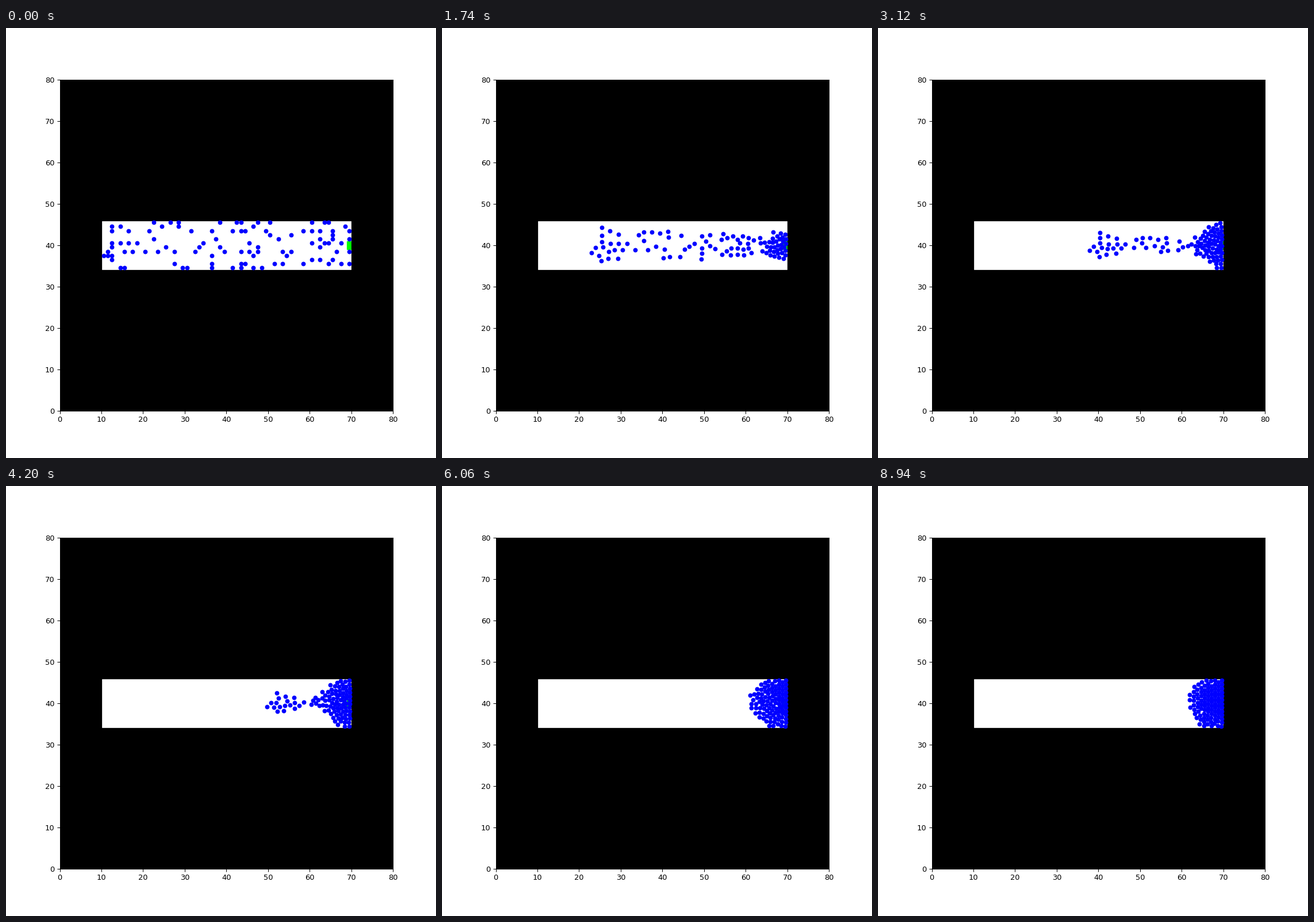
Animation of 748 by 748 pixels, one loop 9 s. Source, as a matplotlib script:

```python
import numpy as np
import matplotlib.pyplot as plt
from matplotlib.animation import FuncAnimation
from matplotlib.patches import Rectangle

INCHES, DPI = 8, 93.5
FRAMES, INTERVAL = 150, 60

# corridor and exit, in axis units
X0, X1, Y0, Y1 = 10, 70, 34, 46
GOAL = np.array([70.0, 40.0])

# social force model, time measured in frames
AGENTS = 100
SPEED, TAU = 0.665, 10.1
PUSH, RANGE, RADIUS = 0.1, 0.08, 0.5
DAMPING, SOFT = 1.5, 0.1
SUBSTEPS = 12

# the last walkers stay in view longest: column -> rows
TAIL = {10: [37], 11: [37, 38], 12: [36, 37, 39, 40, 43, 44],
        14: [34, 40, 44], 15: [34, 38], 16: [40, 43], 17: [38], 18: [40]}


def start():
    """Tail walkers plus a random scatter of distinct cells ahead of them."""
    tail = [(c, r) for c, rows in TAIL.items() for r in rows]
    first = max(TAIL) + 1
    height = Y1 - Y0
    rng = np.random.default_rng(4)
    cells = rng.choice((X1 - first) * height, AGENTS - len(tail), replace=False)
    crowd = [(first + n // height, Y0 + n % height) for n in cells]
    return np.array(tail + crowd) + 0.5


def repel(gap):
    return PUSH * np.exp(np.minimum(-gap / RANGE, 4))


def drag(gap):
    return DAMPING * np.clip(-gap / SOFT, 0, 1)


def acceleration(pos, vel):
    to_goal = GOAL - pos
    heading = to_goal / np.maximum(np.linalg.norm(to_goal, axis=1), 0.05)[:, None]
    acc = (SPEED * heading - vel) / TAU

    # neighbours push apart and lose relative speed on contact
    diff = pos[:, None] - pos[None]
    dist = np.maximum(np.hypot(diff[..., 0], diff[..., 1]), 1e-6)
    np.fill_diagonal(dist, 1e6)
    gap = dist - 2 * RADIUS
    acc += ((repel(gap) / dist)[..., None] * diff).sum(axis=1)
    contact = drag(gap)
    acc += contact @ vel - contact.sum(axis=1)[:, None] * vel

    # walls
    low = pos - (X0, Y0) - RADIUS
    high = (X1, Y1) - pos - RADIUS
    return acc + repel(low) - repel(high) - (drag(low) + drag(high)) * vel


def simulate():
    pos = start()
    vel = np.zeros_like(pos)
    step = 1 / SUBSTEPS
    path = [pos.copy()]
    for _ in range(FRAMES - 1):
        for _ in range(SUBSTEPS):
            vel += step * acceleration(pos, vel)
            pos += step * vel
        path.append(pos.copy())
    return path


path = simulate()

fig, ax = plt.subplots(figsize=(INCHES, INCHES), dpi=DPI)
ax.set_xlim(0, 80)
ax.set_ylim(0, 80)


def block(x, y, w, h, color):
    ax.add_patch(Rectangle((x, y), w, h, color=color, lw=1))


block(69, 39, 1, 2, (0, 1, 0))
block(0, 0, 80, Y0, "black")
block(0, Y1, 80, 80 - Y1, "black")
block(0, Y0, X0, Y1 - Y0, "black")
block(X1, Y0, 80 - X1, Y1 - Y0, "black")

dots, = ax.plot([], [], "o", color="blue", ms=5)


def draw(i):
    dots.set_data(path[i][:, 0], path[i][:, 1])
    return dots,


anim = FuncAnimation(fig, draw, frames=FRAMES, interval=INTERVAL,
                     repeat=True, repeat_delay=0)
plt.show()
```
